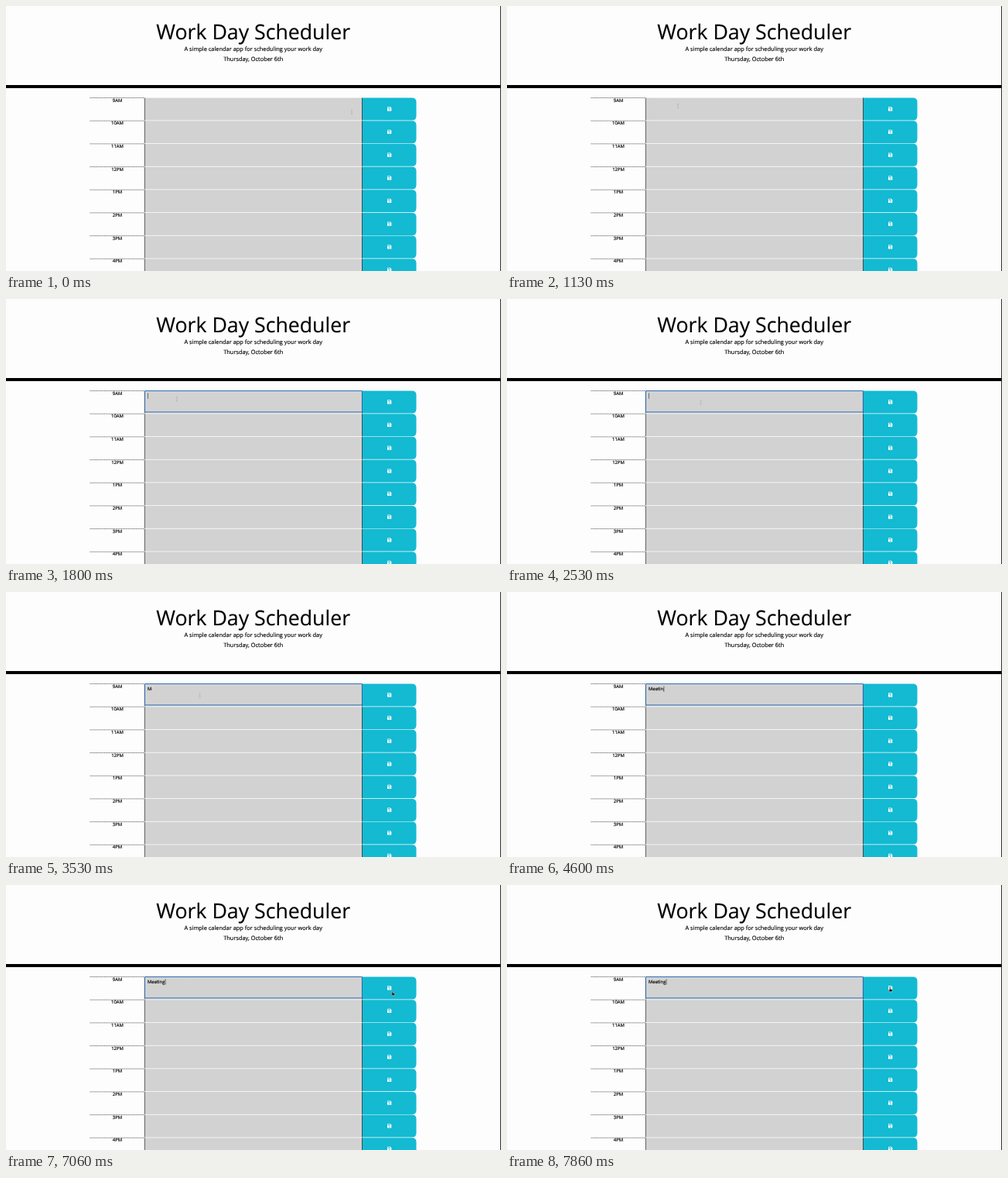
An HTML page that plays this animation: 640 px wide and 342 px high, repeating every 8 s.

```html
<!DOCTYPE html>
<html lang="en">
<head>
<meta charset="utf-8">
<title>Work Day Scheduler</title>
<style>
  html, body { margin: 0; width: 100%; height: 100%; overflow: hidden; background: #fdfdfd; }
  svg { display: block; width: 640px; height: 342px; }
  text {
    font-family: "Open Sans", sans-serif; font-size: 5.94px;
    stroke: #000; stroke-width: .16; text-rendering: geometricPrecision;
  }
  .mid { text-anchor: middle; }
  .title { font-size: 26.7px; }
  .lead { font-size: 7.42px; }
  .line { stroke: #000; stroke-width: .6; fill: none; }

  .anim { animation: 8s linear infinite; }
  .hard { animation-timing-function: step-end; }
  #focus { animation-name: focus; }
  #typing { animation-name: type; }
  #caret { animation-name: blink; }
  #ring { animation-name: ring; transform-origin: 221.5px 129.3px; }
  #beam { animation-name: beam; }
  #beamShow { animation-name: beamShow; }
  #hand { animation-name: hand; }
  #handShow { animation-name: handShow; }

  @keyframes focus { 0% { opacity: 0; } 18.25%, 100% { opacity: 1; } }

  /* caret offset after each burst of letters */
  @keyframes type {
    0% { transform: translateX(0); }
    39.125% { transform: translateX(5.4px); }
    46.625% { transform: translateX(12px); }
    55% { transform: translateX(14.1px); }
    57.5% { transform: translateX(19.4px); }
    60.75%, 100% { transform: translateX(22.6px); }
  }
  @keyframes blink {
    0%, 25%, 38.25%, 44.125%, 50.75%, 67.5%, 79.125%, 91.625% { opacity: 0; }
    18.25%, 31.625%, 39.125%, 46.625%, 55%, 73.25%, 85.75%, 98.25%, 100% { opacity: 1; }
  }
  @keyframes ring {
    0%, 18.24% { opacity: 0; transform: scale(.85); }
    18.25% { opacity: .5; transform: scale(.9); }
    19.125%, 20% { opacity: .85; transform: scale(1); }
    22.5%, 100% { opacity: 0; transform: scale(1); }
  }
  @keyframes beam {
    0%, 14.12% { transform: translate(447px, 137px); }
    14.125%, 25% { transform: translate(221px, 129px); }
    31.6%, 73.2% { transform: translate(250.5px, 133.5px); }
    76.6% { transform: translate(343.5px, 129px); }
    79.1%, 81.6% { transform: translate(385px, 131px); }
    85.6%, 100% { transform: translate(461px, 137px); }
  }
  @keyframes beamShow {
    0%, 73.25% { opacity: 1; }
    52.5%, 85.6%, 100% { opacity: 0; }
  }
  @keyframes hand {
    0%, 85.6% { transform: translate(461px, 137px); }
    88.2%, 92.5% { transform: translate(500.2px, 139.8px); }
    95%, 100% { transform: translate(495.7px, 135px); }
  }
  @keyframes handShow { 0% { opacity: 0; } 85.6%, 100% { opacity: 1; } }
</style>
</head>
<body>
<svg viewBox="0 0 640 342">
  <text class="mid title" x="319.7" y="43.2">Work Day Scheduler</text>
  <text class="mid lead" x="319.7" y="58.3">A simple calendar app for scheduling your work day</text>
  <text class="mid lead" x="319.7" y="71.4">Thursday, October 6th</text>
  <rect y="102" width="640" height="4"/>
  <rect x="639" width="1" height="342" fill="#333"/>

  <g id="rows"></g>

  <text x="183" y="127.1">Meeting</text>
  <g id="typing" class="anim hard">
    <rect x="182.9" y="120.5" width="26" height="9.5" fill="#d2d2d2"/>
    <path id="caret" class="anim hard line" d="M183.3 121.3v7.4"/>
  </g>
  <rect id="focus" class="anim hard" x="179.4" y="118.5" width="281" height="27.4" rx=".6"
        fill="none" stroke="#2f6fb8"/>

  <circle id="ring" class="anim" cx="221.5" cy="129.3" r="11.8" fill="none" stroke="#d65f70" stroke-width="1.5"/>
  <g id="beam" class="anim">
    <path id="beamShow" class="anim hard" d="M-.8-2.6h1.6M0-2.6v5.2M-.8 2.6h1.6"
          fill="none" stroke="#999" stroke-width=".45"/>
  </g>
  <g id="hand" class="anim">
    <path id="handShow" class="anim hard" d="M-1.3-2.6q.7-.7 1.3 0v1.9l2 .5q.7.2.5 1l-.6 2h-2.8l-1.7-2.2q.2-.8 1.3-.1z"
          fill="#111" stroke="#fff" stroke-width=".45"/>
  </g>
</svg>
<script>
  const hours = ["9AM", "10AM", "11AM", "12PM", "1PM", "2PM", "3PM", "4PM"];
  const pitch = 29.68;

  const row = (label, i) => `
    <g transform="translate(0 ${118.2 + i * pitch})">
      <path class="line" stroke-dasharray="1.1 .75" d="M108.5.3H179"/>
      <text class="mid" x="144" y="5.5">${label}</text>
      <rect x="179.2" y=".4" width="281.4" height="28.9" fill="#d2d2d2"/>
      <path d="M460.5.3h64.5q5.5 0 5.5 5.5v18q0 5.5-5.5 5.5h-64.5z" fill="#13bad2"/>
      <path class="line" d="M179.4.3v29M460.5.3v29"/>
      <path d="M493.5 11.9h3.5l1.3 1.3v3.5q0 .5-.5.5h-4.3q-.5 0-.5-.5v-4.3q0-.5.5-.5z" fill="#fff"/>
      <path d="M493.7 12.6h2.9v1.3h-2.9z" fill="#13bad2"/>
      <circle cx="495.6" cy="15.6" r=".75" fill="#13bad2"/>
    </g>`;

  document.getElementById("rows").innerHTML = hours.map(row).join("");
</script>
</body>
</html>
```
